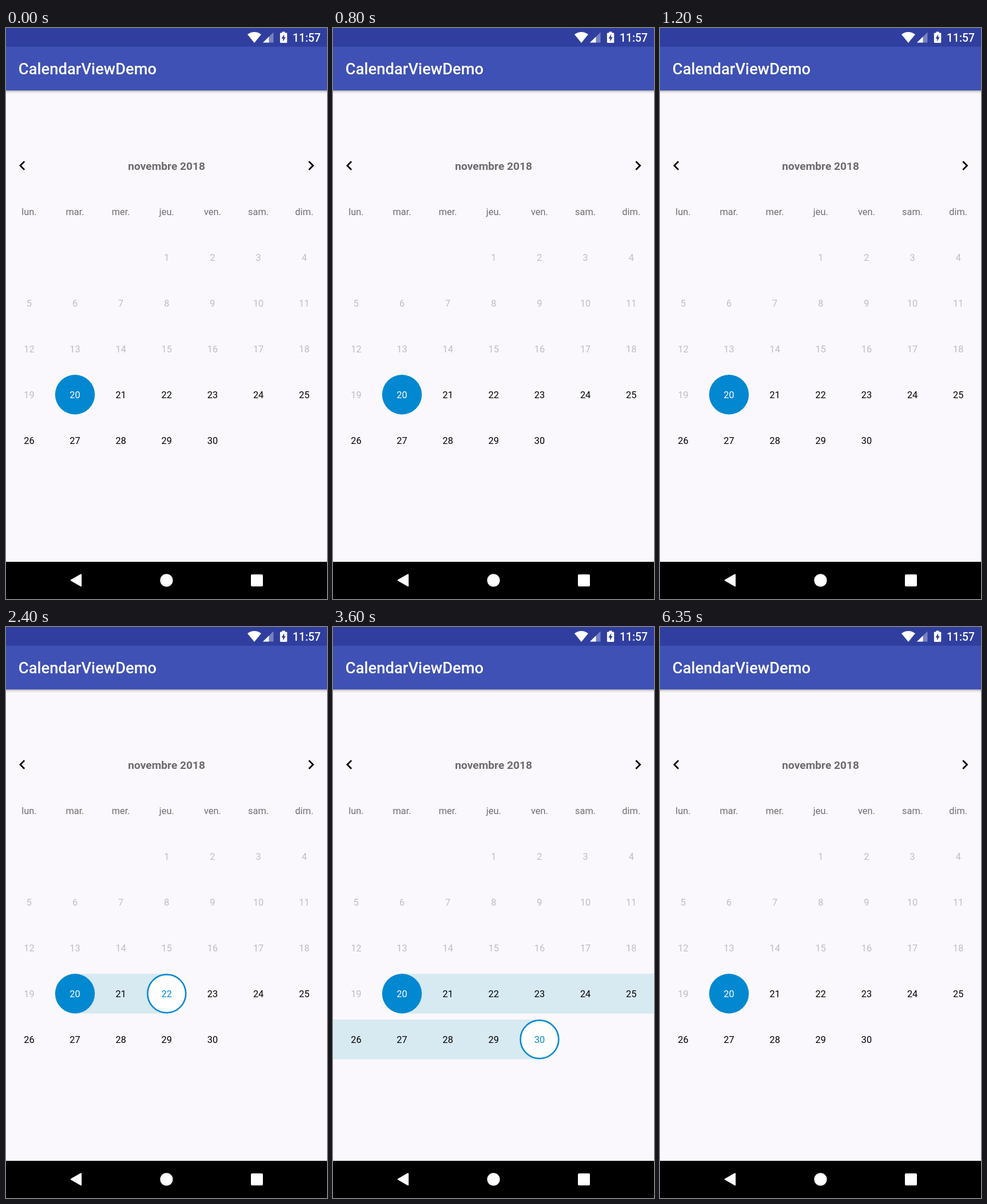
These frames come from a looping animation (561 px wide and 998 px high, 8 s). An HTML page:

```html
<!DOCTYPE html>
<html lang="fr">
<head>
<meta charset="utf-8">
<title>CalendarViewDemo</title>
<style>
  html, body { margin: 0; width: 100%; height: 100%; overflow: hidden; background: #faf8fc; }
  svg { display: block; width: 100%; height: 100%; font-family: Roboto, sans-serif; }
  .cell { font-size: 16.4px; text-anchor: middle; }
  .weekday { fill: #706e71; }
</style>
</head>
<body>
<svg viewBox="0 0 561 998">
  <defs>
    <linearGradient id="shadow" x2="0" y2="1">
      <stop offset="0" stop-color="#000" stop-opacity=".34"/>
      <stop offset=".4" stop-color="#000" stop-opacity=".11"/>
      <stop offset="1" stop-color="#000" stop-opacity="0"/>
    </linearGradient>
  </defs>
  <rect width="561" height="998" fill="#faf8fc"/>

  <rect y="109" width="561" height="6" fill="url(#shadow)"/>
  <rect y="32" width="561" height="77" fill="#3f51b5"/>
  <rect width="561" height="32.7" fill="#303f9f"/>
  <text x="21.8" y="81.3" font-size="27.4" font-weight="500" fill="#fff">CalendarViewDemo</text>

  <!-- status icons -->
  <g fill="#fff">
    <path d="M434 26 L422 11.3 Q427.5 7 434 7 T446 11.3Z"/>
    <path d="M449 25.5 L467.5 7.5 V25.5Z" fill-opacity=".35"/>
    <path d="M449 25.5 L459.5 15.3 V25.5Z"/>
    <path d="M482.5 6.5 h5 v2 h2.5 q1.3 0 1.3 1.3 v14.9 q0 1.3 -1.3 1.3 h-9.8 q-1.3 0 -1.3 -1.3 v-14.9 q0 -1.3 1.3 -1.3 h2.3Z"/>
    <path d="M486.1 11 L481.6 18.4 H484.2 V23.4 L488.7 15.9 H486.1Z" fill="#303f9f"/>
    <text x="501" y="23.8" font-size="19.3" font-weight="500">11:57</text>
  </g>

  <!-- month header -->
  <path transform="translate(12.1 224.1) scale(1.364)" d="M15.41 7.41 L14 6 8 12 14 18 15.41 16.59 10.83 12Z"/>
  <path transform="translate(516.7 224.1) scale(1.364)" d="M10 6 L8.59 7.41 13.17 12 8.59 16.59 10 18 16 12Z"/>
  <text x="280.7" y="247.8" font-size="19.2" font-weight="700" text-anchor="middle" fill="#6c6a6d">novembre 2018</text>

  <g id="bands" fill="#d7e9f1"></g>
  <circle id="start" r="34.7" fill="#0288d1"/>
  <circle id="end" r="33.4" fill="#fff" stroke="#0288d1" stroke-width="2.6"/>
  <g id="labels"></g>

  <!-- navigation bar -->
  <rect y="933" width="561" height="65" fill="#000"/>
  <g fill="#fff">
    <path d="M114 965.2 L131 955.5 V975Z" stroke="#fff" stroke-width="2.4" stroke-linejoin="round"/>
    <circle cx="280.5" cy="965.3" r="11.1"/>
    <rect x="428" y="955" width="21" height="21" rx="2"/>
  </g>
</svg>
<script>
const LOOP = 8000, START_DAY = 20, LAST_DAY = 30, FIRST_COLUMN = 3;
const PITCH = 561 / 7, RADIUS = 34.7, BLUE = '#0288d1';

// Selected end day from each time on; 0 means only the start is selected.
const selections = [[0, 0], [2400, 22], [3600, 30], [5150, 21], [6350, 0]];

const byId = id => document.getElementById(id);
const columnX = column => 40.4 + column * PITCH;
const rowY = row => 400.8 + row * 80;

function add(parent, tag, attributes) {
  const node = document.createElementNS('http://www.w3.org/2000/svg', tag);
  for (const name in attributes) node.setAttribute(name, attributes[name]);
  return parent.appendChild(node);
}

function addLabel(text, x, y, className) {
  const label = add(byId('labels'), 'text', { x, y: y + 6.1, class: className });
  label.textContent = text;
  return label;
}

function place(day) {
  const slot = day + FIRST_COLUMN - 1;
  const row = Math.floor(slot / 7);
  return { row, x: columnX(slot % 7), y: rowY(row) };
}

function moveCircle(id, { x, y }) {
  byId(id).setAttribute('cx', x);
  byId(id).setAttribute('cy', y);
}

function dayColor(day, end) {
  if (day < START_DAY) return '#bfbdc0';
  if (day === START_DAY) return '#fff';
  return day === end ? BLUE : '#000';
}

'lun. mar. mer. jeu. ven. sam. dim.'.split(' ').forEach((name, column) =>
  addLabel(name, columnX(column), rowY(-1), 'cell weekday'));

const dayLabels = Array.from({ length: LAST_DAY }, (_, i) => {
  const { x, y } = place(i + 1);
  return addLabel(i + 1, x, y, 'cell');
});

const start = place(START_DAY);
moveCircle('start', start);

function select(endDay) {
  byId('bands').replaceChildren();
  byId('end').style.display = endDay ? '' : 'none';
  dayLabels.forEach((label, i) => label.setAttribute('fill', dayColor(i + 1, endDay)));
  if (!endDay) return;

  const end = place(endDay);
  moveCircle('end', end);
  for (let row = start.row; row <= end.row; row++) {
    const left = row === start.row ? start.x : 0.6;
    const right = row === end.row ? end.x : 560.4;
    add(byId('bands'), 'rect', {
      x: left, y: rowY(row) - RADIUS, width: right - left, height: 2 * RADIUS
    });
  }
}

let shown;
function frame() {
  const time = performance.now() % LOOP;
  const endDay = selections.findLast(([from]) => from <= time)[1];
  if (endDay !== shown) select(shown = endDay);
  requestAnimationFrame(frame);
}
frame();
</script>
</body>
</html>
```
